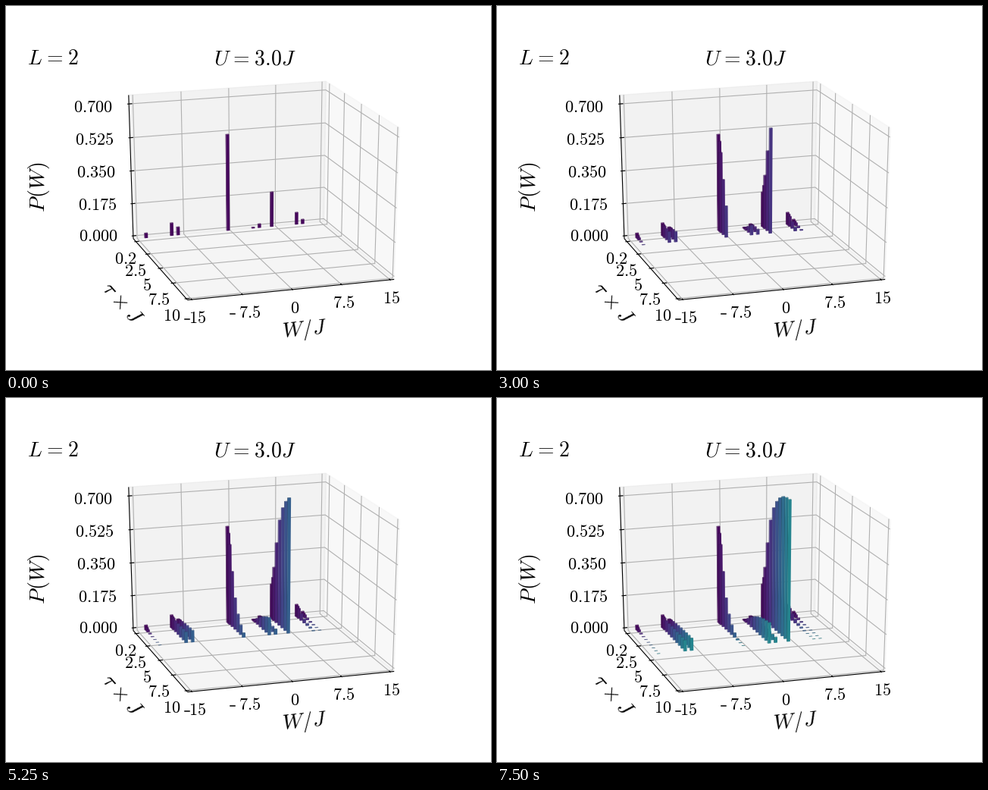
Write a matplotlib script that moves like this. It is 640 px wide and 480 px high and loops after 8000 ms.

```python
import numpy as np
import matplotlib.pyplot as plt
from matplotlib.animation import FuncAnimation
from matplotlib.collections import PolyCollection

plt.rcParams["mathtext.fontset"] = "cm"

STEP, TICK, LOOP = 750, 250, 8000
ELEV, AZIM, DIST = np.radians(21), np.radians(-107.5), 10
E = 0.5 + 1 / 48  # half width of the pane box
W_MAX, TAU_MIN, TAU_MAX, P_MAX = 15, -0.15, 10, 0.73
BAR_W, BAR_D = 0.5, 0.09
TAUS = np.r_[0.2:0.7:0.2, 1:5:0.5]

# Work value = final level + offset of the initial level
FINAL = (-13.98, -0.77, 6.39)
OFFSET = (0, 4.1, 5.12)


def probabilities(tau):
    """P(W) with one row per initial level, one column per final level."""
    fade = np.exp(-(tau / 3.3) ** 6) / (1 + 0.76 * tau ** 2.45)
    low, mid = 0.04 * np.exp(-1.9 * tau), 0.527 * fade
    quick = np.exp(-2 * tau)
    return [
        (low, mid, 0.738 - low - mid),
        (0.059 + 0.016 * quick, 0.003 + 0.113 * (1 - np.exp(-0.33 * tau ** 1.5)),
         0.068 * fade),
        (0.068 - 0.026 * np.exp(-0.6 * tau), 0.03 - 0.012 * quick,
         0.032 * np.exp(-1.1 * tau)),
    ]


def project(x, y, z):
    """Camera view of the unit cube, in stage pixels."""
    sa, ca, se, ce = np.sin(AZIM), np.cos(AZIM), np.sin(ELEV), np.cos(ELEV)
    depth = DIST - (ce * ca * x + ce * sa * y + se * z)
    right = -sa * x + ca * y
    up = -se * ca * x - se * sa * y + ce * z
    return 334.7 + 2681 * right / depth, 237.4 - 1997.8 * up / depth


def unit(w=0, tau=0, p=0):
    return (w / (2 * W_MAX), 0.5 - (tau - TAU_MIN) / (TAU_MAX - TAU_MIN),
            p / P_MAX - 0.5)


def path(*points):
    return np.array([project(*p) for p in points])


def line(*points, color="black", order=3):
    ax.plot(*path(*points).T, color=color, lw=0.8, zorder=order,
            solid_capstyle="butt")


def grid(*points):
    line(*points, color="#b0b0b0", order=2)


def pane(grey, *points):
    tone = (grey, grey, grey, 0.5)
    ax.add_patch(plt.Polygon(path(*points), fc=tone, ec=tone, lw=1, zorder=1))


def label(x, y, text, size=16, **kw):
    ax.text(x, y, f"${text}$", size=size, **{"ha": "center", "va": "baseline", **kw})


fig = plt.figure(figsize=(6.4, 4.8), dpi=100, facecolor="white")
ax = fig.add_axes([0, 0, 1, 1])
ax.set(xlim=(0, 640), ylim=(480, 0))
ax.axis("off")

# Panes and axis lines
pane(0.95, (E, -E, -E), (E, E, -E), (E, E, E), (E, -E, E))
pane(0.90, (-E, E, -E), (E, E, -E), (E, E, E), (-E, E, E))
pane(0.925, (-E, -E, -E), (E, -E, -E), (E, E, -E), (-E, E, -E))
line((-E, -E, -E), (E, -E, -E))
line((-E, -E, -E), (-E, E, -E))
line((-E, E, -E), (-E, E, E))

# Grid, ticks and tick labels
OUT, IN = E + 0.1 / 12, E - 0.2 / 12
for w in np.linspace(-W_MAX, W_MAX, 5):
    x = unit(w=w)[0]
    grid((x, -E, -E), (x, E, -E), (x, E, E))
    line((x, -OUT, -E), (x, -IN, -E))
    px, py = project(x, -E, -E)
    px, py = px + 3.4 - w / 12, py + 31
    if w < 0:  # hyphen in front of the digits
        left = px - (20 if w % 1 else 14)
        ax.plot([left, left + 6], [py - 5, py - 5], color="black", lw=1.1)
        px += 6 if w % 1 else 3
    label(px, py, f"{abs(w):g}")

for tau in (0.2, 2.5, 5, 7.5, 10):
    y = unit(tau=tau)[1]
    grid((-E, y, -E), (E, y, -E), (E, y, E))
    line((-OUT, y, -E), (-IN, y, -E))
    px, py = project(-E, y, -E)
    label(px - 14 - tau / 2, py + 29, f"{tau:g}")

for p in np.linspace(0, 0.7, 5):
    z = unit(p=p)[2]
    grid((-E, E, z), (E, E, z), (E, -E, z))
    line((-OUT, E, z), (-IN, E, z))
    px, py = project(-E, E, z)
    label(px - 45.5 - 3 * p, py + 7 + 5 * p, f"{p:.3f}")

# Titles
GAP = r"\hspace{0.07}"
label(28, 77, f"L{GAP}={GAP}2", 20, ha="left")
label(274, 78, f"U{GAP}={GAP}3.0J", 20, ha="left")
label(44, 239, f"P{GAP}(W)", 20, va="center", rotation=90)
label(394, 428, "W/J", 20, va="center", rotation=5.7)
label(153.5, 392, rf"\tau{GAP}\times{GAP}J", 20, va="center", rotation=-48.4)


def bar(w, tau, p, color):
    """Left, front and top faces of one bar with their shades."""
    x0, y1, z0 = unit(w - BAR_W / 2, tau - BAR_D / 2, 0)
    x1, y0, z1 = unit(w + BAR_W / 2, tau + BAR_D / 2, p)
    left = path((x0, y0, z0), (x0, y1, z0), (x0, y1, z1), (x0, y0, z1))
    front = path((x0, y0, z0), (x1, y0, z0), (x1, y0, z1), (x0, y0, z1))
    top = path((x0, y0, z1), (x1, y0, z1), (x1, y1, z1), (x0, y1, z1))
    return [(left, color * 0.75), (front, color), (top, color * 0.8)]


def row(tau):
    color = np.array(plt.cm.viridis(tau / TAU_MAX)[:3])
    return [face
            for offset, chances in zip(OFFSET, probabilities(tau))
            for final, p in zip(FINAL, chances)
            for face in bar(final + offset, tau, p, color)]


rows = [row(tau) for tau in TAUS]
bars = PolyCollection([], linewidths=0, zorder=4)
ax.add_collection(bars, autolim=False)


def draw(frame):
    shown = sum(rows[:frame * TICK // STEP + 1], [])
    bars.set_verts([shape for shape, _ in shown])
    bars.set_facecolor([color for _, color in shown])
    return (bars,)


anim = FuncAnimation(fig, draw, frames=LOOP // TICK, interval=TICK,
                     repeat=True, repeat_delay=0, blit=False)
plt.show()
```
